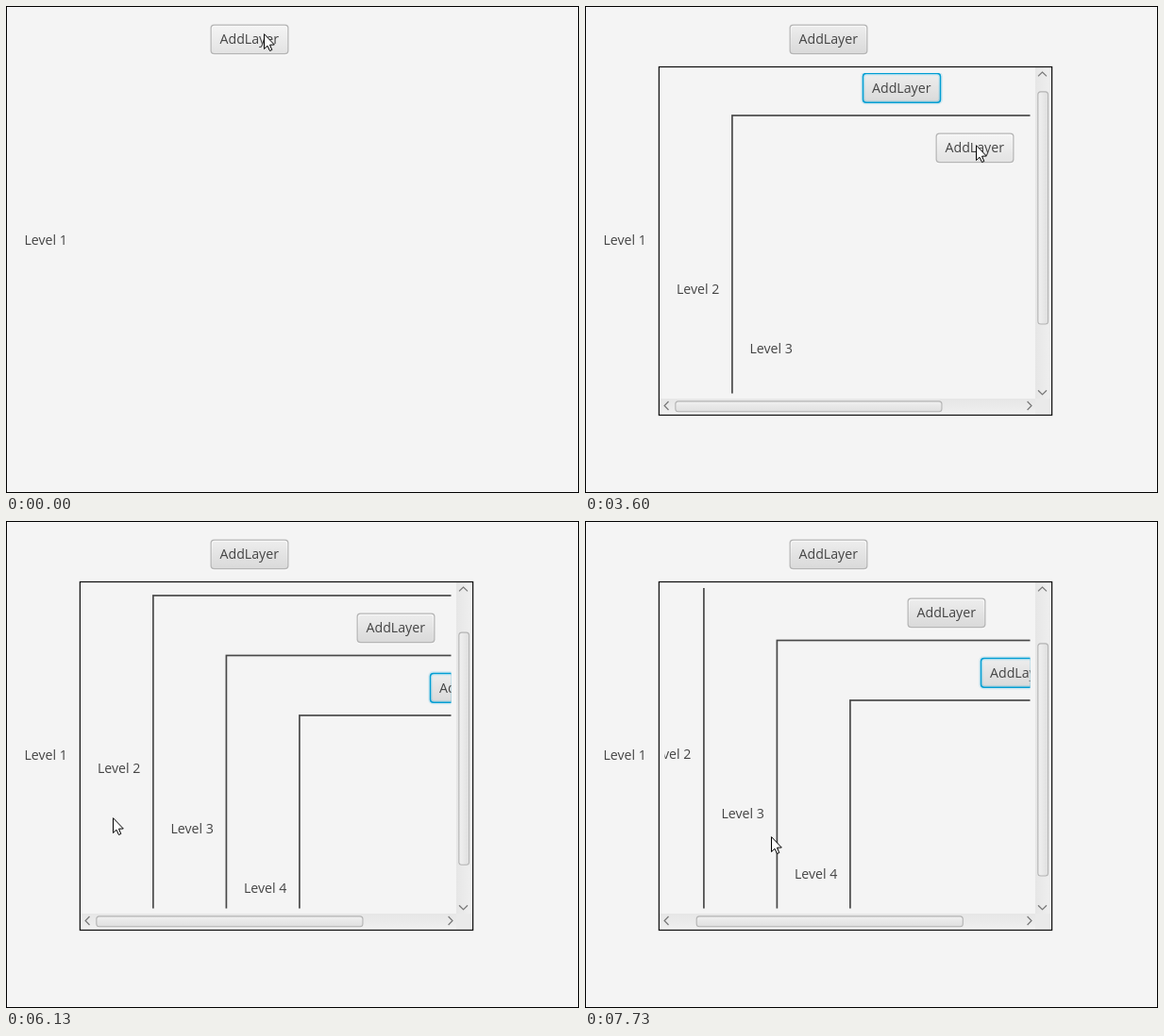
An HTML page with a canvas for the animation above (8000 ms loop, 607 by 516 pixels).

```html
<!DOCTYPE html>
<html lang="en">
<head>
<meta charset="utf-8">
<title>Nested layers</title>
<style>
  html, body { margin: 0; width: 100%; height: 100%; overflow: hidden; background: #f4f4f4; }
  canvas { display: block; }
</style>
</head>
<body>
<canvas id="stage" width="607" height="516"></canvas>
<script>
const c = document.getElementById('stage').getContext('2d');
const LOOP = 8000, TICK = 1000 / 15;
const DX = 77.5, DY = 63.5; // offset of each nested level
const BTN = { x: 216.5, y: 19.5, w: 83, h: 31.7 };

// All times below are in ticks.
const PRESS = [11, 43, 57, 72];
const ADDED = [15, 46, 60, 75];
const CURSOR = [
  [16, 273, 29], [24, 399, 293], [33, 399, 293], [38, 387, 63], [40, 352, 85],
  [47, 352, 85], [54, 414, 147], [61, 414, 147], [68, 459, 210],
  [76, 459, 210], [83, 113, 314], [114, 113, 314], [116, 197, 334]
];

const easeOut = (k, start, steps, power) =>
  1 - (1 - Math.min(1, Math.max(0, (k - start) / steps))) ** power;
const scrollY = k =>
  12 * easeOut(k, 28, 4, 2) + 37.4 * easeOut(k, 85, 8, 2.2) + 15.6 * easeOut(k, 105, 6, 2.2);
const scrollX = k => 30 * easeOut(k, 97, 5, 3);

function cursorAt(k) {
  const i = CURSOR.findIndex(p => p[0] > k);
  if (i === 0) return CURSOR[0].slice(1);
  if (i < 0) return CURSOR[CURSOR.length - 1].slice(1);
  const [k0, x0, y0] = CURSOR[i - 1], [k1, x1, y1] = CURSOR[i];
  const p = (k - k0) / (k1 - k0), e = p * p * (3 - 2 * p);
  return [x0 + (x1 - x0) * e, y0 + (y1 - y0) * e];
}

function gradient(x0, y0, x1, y1, from, to) {
  const g = c.createLinearGradient(x0, y0, x1, y1);
  g.addColorStop(0, from);
  g.addColorStop(1, to);
  return g;
}

function round(x, y, w, h, r, fill) {
  c.fillStyle = fill;
  c.beginPath();
  c.roundRect(x, y, w, h, r);
  c.fill();
}

function text(s, x, y) {
  c.font = '14.2px "Open Sans", "Noto Sans", sans-serif';
  c.fillStyle = '#444';
  c.fillText(s, x, y);
}

function button(x, y, state) {
  const { w, h } = BTN;
  const layer = (inset, r, fill) =>
    round(x + inset, y + inset, w - 2 * inset, h - 2 * inset, r, fill);
  const [top, bottom] = state.pressed ? ['#e0e0e0', '#cccccc']
    : state.hover ? ['#f5f5f5', '#e2e2e2'] : ['#eeeeee', '#d9d9d9'];
  if (state.focus) {
    layer(-1.75, 5, 'rgba(3,158,211,.14)');
    layer(-0.25, 4, '#039ed3');
  } else {
    round(x, y + 1.2, w, h, 4, 'rgba(255,255,255,.7)');
    layer(0, 4, '#b5b5b5');
  }
  layer(1.25, 3, gradient(0, y, 0, y + h, state.pressed ? '#e6e6e6' : '#fafafa', bottom));
  if (state.focus) layer(1.25, 3, 'rgba(3,158,211,.2)');
  layer(2.5, 2, gradient(0, y, 0, y + h, top, bottom));
  text('AddLayer', x + 10, y + 20.8);
}

function level(n, k, cur, sx, sy) {
  const ox = n * DX - sx, oy = n * DY - sy;
  const x = BTN.x + ox, y = BTN.y + oy;
  const focused = PRESS.filter(p => k >= p).length - 1;
  button(x, y, {
    focus: focused === n,
    pressed: k >= PRESS[n] && k < ADDED[n],
    hover: cur[0] > x && cur[0] < x + BTN.w && cur[1] > y && cur[1] < y + BTN.h
  });
  text('Level ' + (n + 1), 19.4 + ox, 253 + oy);
}

function chevron(x, y, dx, dy) {
  c.strokeStyle = '#777';
  c.lineWidth = 1.2;
  c.beginPath();
  c.moveTo(x - 2.2 * dx - 4.5 * dy, y - 2.2 * dy - 4.5 * dx);
  c.lineTo(x + 2.2 * dx, y + 2.2 * dy);
  c.lineTo(x - 2.2 * dx + 4.5 * dy, y - 2.2 * dy + 4.5 * dx);
  c.stroke();
}

function thumb(x, y, w, h, dx, dy) {
  round(x, y, w, h, 3.5, '#b3b3b3');
  round(x + 1.1, y + 1.1, w - 2.2, h - 2.2, 2.5,
    gradient(x, y, x + dx * w, y + dy * h, '#f2f2f2', '#dedede'));
}

function scrollBars(sx, sy) {
  c.fillStyle = gradient(477, 0, 493, 0, '#e6e6e6', '#efefef');
  c.fillRect(477, 65, 17, 351);
  c.fillStyle = gradient(0, 416, 0, 432, '#e6e6e6', '#efefef');
  c.fillRect(79, 416, 398, 17);
  c.fillStyle = '#eaeaea';
  c.fillRect(477, 416, 17, 17);
  thumb(479.3, 81.5 + 0.735 * sy, 11.8, 247.3, 1, 0);
  thumb(95.3 + 0.745 * sx, 418.3, 283.2, 12, 0, 1);
  chevron(484.5, 72.2, 0, -1);
  chevron(484.5, 409.5, 0, 1);
  chevron(86.3, 423.5, -1, 0);
  chevron(470.8, 423.5, 1, 0);
}

function frame(n, sx, sy) {
  c.strokeRect(78.4 + n * DX - sx, 64.5 + n * DY - sy, 416.2, 369);
}

function pointer([x, y]) {
  c.save();
  c.translate(Math.round(x), Math.round(y));
  c.beginPath();
  [[.5, .7], [.5, 16.5], [4, 13.2], [6.5, 18.5], [8.8, 17.5], [6.5, 12.2], [11.3, 12]]
    .forEach(p => c.lineTo(...p));
  c.closePath();
  c.fillStyle = '#fff';
  c.fill();
  c.strokeStyle = '#000';
  c.lineWidth = 1;
  c.stroke();
  c.restore();
}

function draw(k) {
  const cur = cursorAt(k), sx = scrollX(k), sy = scrollY(k);
  const layers = ADDED.filter(a => k >= a).length;
  c.fillStyle = '#f4f4f4';
  c.fillRect(0, 0, 607, 516);
  c.strokeStyle = '#000';
  c.lineWidth = 1;
  c.strokeRect(.5, .5, 606, 515);
  level(0, k, cur, 0, 0);
  if (layers) {
    scrollBars(sx, sy);
    c.strokeStyle = '#111';
    c.lineWidth = 1.25;
    frame(0, 0, 0);
    c.save();
    c.beginPath();
    c.rect(84.5, 71, 387, 339.5);
    c.clip();
    for (let n = 1; n <= layers; n++) {
      if (n < 4) level(n, k, cur, sx, sy);
      if (n < layers) {
        c.strokeStyle = 'rgba(0,0,0,.7)';
        c.lineWidth = 1.7;
        frame(n, sx, sy);
      }
    }
    c.restore();
  }
  pointer(cur);
}

function tick() {
  draw(Math.floor((performance.now() % LOOP) / TICK + 0.1));
  requestAnimationFrame(tick);
}
tick();
</script>
</body>
</html>
```
